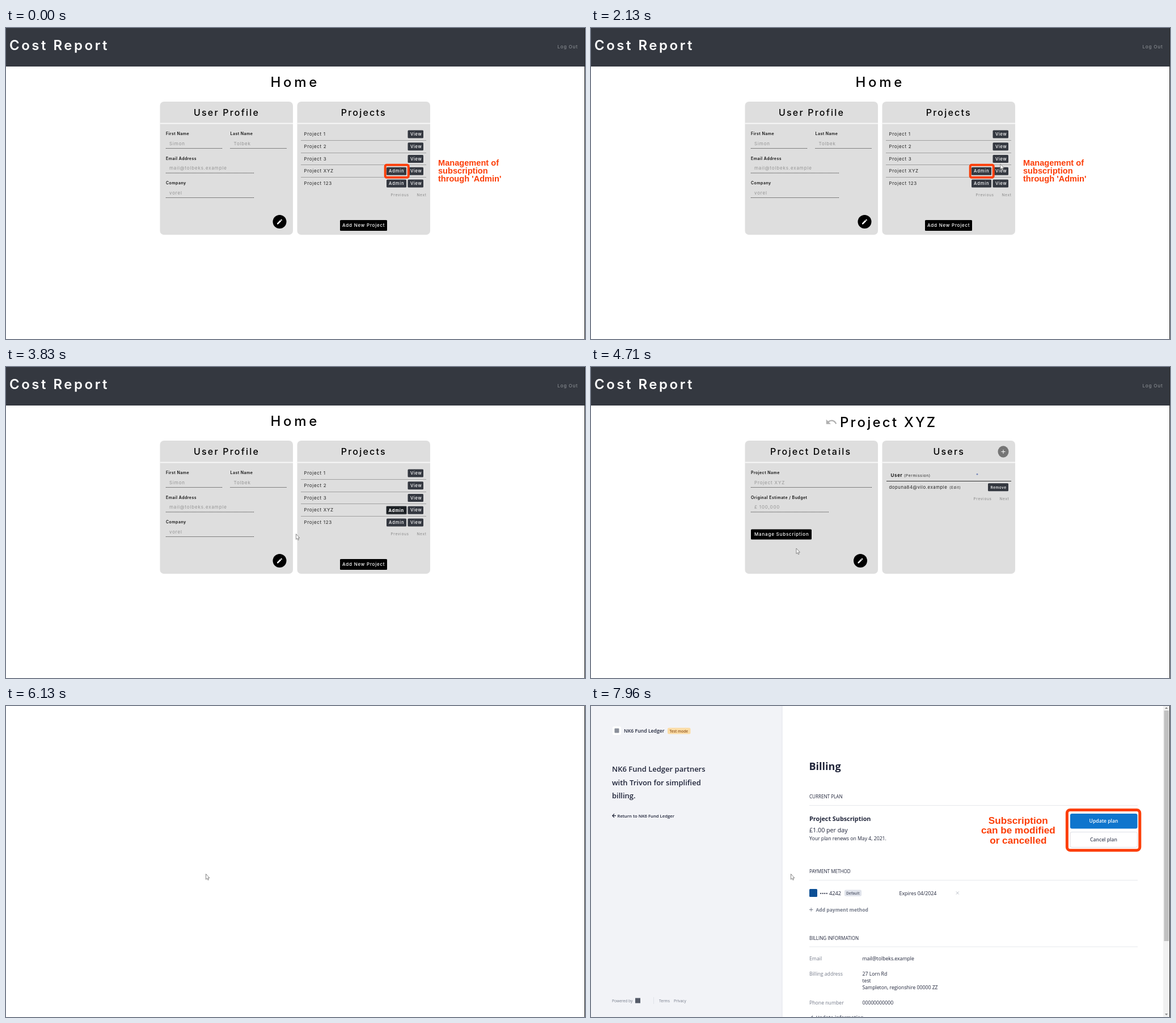
An HTML page that plays this animation: 1021x549 px, repeating every 8 s.

```html
<!DOCTYPE html>
<html lang="en">
<head>
<meta charset="utf-8">
<title>Managing a subscription</title>
<style>
  html, body { margin: 0; width: 100%; height: 100%; overflow: hidden; background: #fff; }
  svg { display: block; width: 100%; height: 100%; }
  text { white-space: pre; }
  .app { font-family: Inter, sans-serif; }
  .portal { font-family: "Open Sans", sans-serif; }
  .note { font-family: "Liberation Sans", Arial, sans-serif; font-weight: 700; }
</style>
</head>
<body>
<svg id="stage" viewBox="0 0 1021 549"></svg>
<script>
const LOOP = 8000;
const RED = '#fc3e08', DARK = '#343840', INK = '#20253a', MUTED = '#757b8a';
const USER = { first: 'Simon', last: 'Tolbek', email: 'mail@tolbeks.example', company: 'vorel' };
const SHOP = 'NK6 Fund Ledger';

// Drawing helpers: each returns SVG markup.
const text = (x, y, str, size, { fill = '#000', weight = 400, gap = 0, anchor = 'start' } = {}) =>
  `<text x="${x}" y="${y}" font-size="${size}" font-weight="${weight}" fill="${fill}" letter-spacing="${gap}" text-anchor="${anchor}">${str}</text>`;
const rect = (x, y, w, h, fill, r = 0, extra = '') =>
  `<rect x="${x}" y="${y}" width="${w}" height="${h}" rx="${r}" fill="${fill}" ${extra}/>`;
const path = (d, stroke, width = 1, extra = '') =>
  `<path d="${d}" fill="none" stroke="${stroke}" stroke-width="${width}" ${extra}/>`;
const rule = (x1, x2, y, color, extra) => path(`M${x1} ${y}H${x2}`, color, 1, extra);
const group = (id, cls, ...parts) => `<g id="${id}" class="${cls}">${parts.join('')}</g>`;

// Parts of the app pages
const label = (x, y, str) => text(x, y, str, 7, { weight: 600, gap: .45, fill: '#111' });
const field = (x, end, y, name, value) =>
  label(x, y, name) +
  text(x + 6, y + 17.5, value, 8, { fill: '#959595', gap: .85 }) +
  rule(x, end, y + 23.5, '#222', 'stroke-dasharray="1 1"');
const button = (x, y, w, h, str, textX, size, gap, fill = DARK) =>
  rect(x, y, w, h, fill, 1.5) +
  text(textX, y + h / 2 + size * .36, str, size, { fill: '#fff', weight: 500, gap });
const card = (x, titleX, title) =>
  rect(x, 130, 234.5, 235, '#dedede', 7) + rect(x, 167.5, 234.5, 2, '#f8f8f8') +
  text(titleX, 154.8, title, 16, { weight: 500, gap: 2.2 });
const editButton = x =>
  `<circle cx="${x}" cy="342" r="12"/>
   <path fill="#fff" transform="translate(${x - 6} 336) scale(.5)" d="M3 17.25V21h3.75L17.81 9.94l-3.75-3.75L3 17.25zM20.71 7.04a1 1 0 0 0 0-1.41l-2.34-2.34a1 1 0 0 0-1.41 0l-1.83 1.83 3.75 3.75z"/>`;
const pager = (x1, x2, y) =>
  text(x1, y, 'Previous', 6.5, { fill: '#888', gap: .7 }) + text(x2, y, 'Next', 6.5, { fill: '#888', gap: .7 });

const projectRow = (name, i) => {
  const y = 187.6 + i * 21.72;
  return text(525.4, y + 2.7, name, 8, { fill: '#222', gap: .7 }) +
    button(708.5, y - 7, 27.5, 14, 'View', 713, 7.5, .7) +
    (i > 2 ? button(671, y - 7, 35, 14, 'Admin', 675, 7.5, .9) : '') +
    (i < 4 ? rule(520, 741, Math.round(y + 10.4) + .5, '#a0a0a0') : '');
};

const header = group('header', 'app',
  rect(0, 0, 1021, 68, DARK),
  text(6, 38.8, 'Cost Report', 24, { fill: '#fff', weight: 600, gap: 3.5 }),
  text(972.4, 36, 'Log Out', 8, { fill: '#85898e', weight: 500, gap: .85 }));

const home = group('home', 'app',
  text(466.5, 104, 'Home', 24, { weight: 500, gap: 4.7 }),
  card(271.5, 331, 'User Profile'),
  field(282, 382, 189, 'First Name', USER.first),
  field(395.5, 495, 189, 'Last Name', USER.last),
  field(282, 438, 232.5, 'Email Address', USER.email),
  field(282, 438, 276, 'Company', USER.company),
  editButton(482.5),
  card(513.5, 590.8, 'Projects'),
  ['Project 1', 'Project 2', 'Project 3', 'Project XYZ', 'Project 123'].map(projectRow).join(''),
  pager(678.5, 724.5, 297),
  button(589, 339, 83, 19, 'Add New Project', 593, 8, .75, '#000'));

const adminPressed = group('adminPressed', 'app',
  rect(670.5, 245.5, 36, 14.5, '#1d2125', 1.5, 'stroke="#8b8d90"'),
  text(674.6, 255.5, 'Admin', 7.5, { fill: '#fff', weight: 700, gap: .7 }));

const homeNote = group('homeNote', 'note',
  rect(668.7, 241.7, 41, 22, 'none', 2.5, `stroke="${RED}" stroke-width="4"`),
  ['Management of', 'subscription', "through 'Admin'"]
    .map((line, i) => text(762, 243 + i * 14.2, line, 14.6, { fill: RED, weight: 700 })).join(''));

const project = group('project', 'app',
  `<path fill="#b0b0b0" transform="translate(413 86.3) scale(.9)" d="M12.5 8c-2.65 0-5.05.99-6.9 2.6L2 7v9h9l-3.62-3.62c1.39-1.16 3.16-1.88 5.12-1.88 3.54 0 6.55 2.31 7.6 5.5l2.37-.78C21.08 11.03 17.15 8 12.5 8z"/>`,
  text(439, 105.5, 'Project XYZ', 24, { weight: 500, gap: 3.2 }),
  card(271.5, 316, 'Project Details'),
  field(282, 495, 189, 'Project Name', 'Project XYZ'),
  field(282, 420, 232.5, 'Original Estimate / Budget', '£ 100,000'),
  button(282, 286.5, 107, 18, 'Manage Subscription', 288, 8, .8, '#000'),
  editButton(475),
  card(513.5, 603.5, 'Users'),
  '<ellipse cx="727" cy="149.5" rx="9.5" ry="10.3" fill="#757575"/>',
  path('M723.5 149.5h7M727 146v7', '#fff'),
  text(528.5, 193.5, 'User', 8, { weight: 600, gap: .7 }),
  text(552, 193.5, '(Permission)', 6.5, { fill: '#222', gap: .68 }),
  '<circle cx="681" cy="189.3" r="1.4" fill="#7284b8"/>',
  rule(521, 741, 201.5, '#333'),
  text(525.5, 215, 'dopuna84@vilo.example', 7.8, { fill: '#222', gap: .55 }),
  text(632, 215, '(Edit)', 6.5, { fill: '#222', gap: .65 }),
  button(700, 205.3, 36, 14, 'Remove', 704.6, 6.5, .5),
  pager(674.5, 720.5, 234.7));

const managePressed = group('managePressed', 'app',
  rect(281.7, 286.2, 107.6, 18.4, '#747477', 1.5, 'stroke="#a3b1d6" stroke-width="1.6"'),
  text(288, 298.4, 'Manage Subscription', 8, { fill: '#2c2c2e', weight: 500, gap: .8 }));

// Parts of the billing portal
const portal = group('portal', 'portal',
  rect(0, 0, 338, 549, '#f2f3f7'),
  rect(335, 0, 3, 549, '#eeeff4'),
  rect(38, 36, 15, 15, '#fff', 3), rect(41.5, 39.5, 8, 8, '#8a8f9a', 1),
  text(58, 47, SHOP, 8.7, { fill: INK, weight: 600 }),
  rect(135, 38.5, 40.5, 11, '#fbdca6', 2.5),
  text(138.6, 46.5, 'Test mode', 6.5, { fill: '#8f5520', weight: 600 }),
  [SHOP + ' partners', 'with Trivon for simplified', 'billing.']
    .map((line, i) => text(37, 116 + i * 23.6, line, 13, { fill: INK, weight: 600 })).join(''),
  path('M44 193.7H38M41 190.5l-3.2 3.2 3.2 3.2', INK, 1.2),
  text(46.5, 196.5, 'Return to ' + SHOP, 7.7, { fill: INK, weight: 600 }),
  text(37, 522.7, 'Powered by', 6.7, { fill: MUTED }),
  rect(78, 515.5, 9, 9, '#555b68'),
  path('M110.5 514V526', '#dfe2e8'),
  text(120, 522.7, 'Terms', 6.6, { fill: MUTED }),
  text(146, 522.7, 'Privacy', 6.6, { fill: MUTED }));

const spinner = group('spinner', '', path('M679 269.2a4 4 0 1 1 -3.2 6.3', '#d3d5da', 1.2));

const section = (y, title) => text(385, y, title, 8.1, { fill: INK }) + rule(385, 964, y + 12.5, '#e6e8ec');
const detail = (y, name, lines) =>
  text(385, y, name, 8.7, { fill: MUTED }) +
  lines.map((line, i) => text(478.5, y + i * 12.4, line, 8.7, { fill: INK })).join('');

const billing = group('billing', 'portal',
  text(384.5, 112.8, 'Billing', 18, { fill: INK, weight: 700 }),
  section(163, 'CURRENT PLAN'),
  text(385, 202.8, 'Project Subscription', 10.8, { fill: INK, weight: 700 }),
  text(385, 223, '£1.00 per day', 10.7, { fill: INK }),
  text(385, 237, 'Your plan renews on May 4, 2021.', 8.7, { fill: INK }),
  rect(845, 190, 118.5, 26.5, '#0f75cd', 3),
  text(904, 206.3, 'Update plan', 8.6, { fill: '#fff', weight: 600, anchor: 'middle' }),
  rect(845, 222.5, 118.5, 27, '#fff', 3, 'stroke="#dcdfe6"'),
  text(904, 239.3, 'Cancel plan', 8.6, { fill: '#454b5e', weight: 600, anchor: 'middle' }),
  section(295, 'PAYMENT METHOD'),
  rect(385, 323, 14, 14, '#0c4f95', 1.5),
  text(403.5, 334, '•••• 4242', 9.3, { fill: INK }),
  rect(447, 324.5, 30, 11.3, '#dfe2ea', 2.5),
  text(450, 332.5, 'Default', 6.6, { fill: '#545a6c', weight: 600 }),
  text(543.5, 334, 'Expires 04/2024', 8.9, { fill: INK }),
  path('M643.8 327.5l5 5M648.8 327.5l-5 5', '#b4b8c2', .9),
  path('M385 359.5h6.4M388.2 356.3v6.4', MUTED, 1),
  text(396.5, 362.8, 'Add payment method', 8.5, { fill: MUTED, weight: 700 }),
  section(412.5, 'BILLING INFORMATION'),
  detail(449.2, 'Email', [USER.email]),
  detail(475.5, 'Billing address', ['27 Lorn Rd', 'test', 'Sampleton, regionshire 00000 ZZ']),
  detail(526.5, 'Phone number', ['00000000000']),
  path('M387 551l4-4', MUTED, 1.6),
  text(396.5, 553, 'Update information', 8.5, { fill: MUTED, weight: 700 }),
  rect(1009, 0, 11, 549, '#f1f1f1'), rect(1010.5, 8, 8.5, 407, '#c1c1c1'),
  '<path fill="#888" d="M1012 5l2.6-3 2.6 3zM1012 543l2.6 3 2.6-3z"/>',
  `<g class="note">${rect(839.4, 183.5, 128.4, 71.2, 'none', 5.5, `stroke="${RED}" stroke-width="5"`)}`,
  ['Subscription', 'can be modified', 'or cancelled']
    .map((line, i) => text(753.3, 208 + i * 17.3, line, 17.2, { fill: RED, weight: 700, anchor: 'middle' })).join(''),
  '</g>');

const cursor = group('cursor', '',
  '<path id="arrow" fill="#fff" stroke="#777" stroke-width=".9" stroke-linejoin="round" d="M0 0V9.6L2.1 7.7 3.5 10.8 5 10.1 3.6 7.1H6.4Z"/>',
  '<path id="hand" fill="#fff" stroke="#333" stroke-width=".7" stroke-linejoin="round" d="M-1 .8Q0-.6 1 .8V5q1-.8 1.8.2 1-.6 1.7.4 1.2-.3 1.3.9V9.5L4.8 13H-.8L-4 8.6q0-1.6 1.4-1L-1 9Z"/>');

const stage = document.getElementById('stage');
stage.innerHTML = rect(0, 0, 1021, 549, '#fff') + header + home + adminPressed + homeNote +
  project + managePressed + portal + spinner + billing +
  rect(1020, 0, 1, 549, '#222') + cursor;

// Visible interval of each part, in ms
const visible = {
  header: [0, 6130], home: [0, 4400], homeNote: [0, 2800], adminPressed: [3000, 4400],
  project: [4400, 6130], managePressed: [5600, 6130],
  portal: [6920, LOOP], spinner: [6920, 7560], billing: [7560, LOOP],
  hand: [2480, 3440]
};

// Cursor stops: time, x, y
const stops = [
  [0, 876, 556], [880, 876, 556], [1670, 747, 291], [2130, 722, 240], [2520, 682, 251],
  [3290, 680, 250], [3420, 680, 250], [4210, 356, 336], [4710, 362, 320],
  [5080, 362, 320], [5500, 352.5, 296.5], [LOOP, 352.5, 296.5]
];

function cursorAt(t) {
  const i = stops.findIndex(stop => stop[0] > t);
  const [t0, x0, y0] = stops[i - 1], [t1, x1, y1] = stops[i];
  const k = (t - t0) / (t1 - t0);
  return [x0 + (x1 - x0) * k, y0 + (y1 - y0) * k];
}

const part = id => document.getElementById(id);
const show = (id, on) => part(id).setAttribute('display', on ? 'inline' : 'none');

function draw(t) {
  for (const [id, [from, to]] of Object.entries(visible)) show(id, t >= from && t < to);
  show('arrow', t < visible.hand[0] || t >= visible.hand[1]);
  part('cursor').setAttribute('transform', `translate(${cursorAt(t)})`);
  part('spinner').setAttribute('transform', `rotate(${(t - 7380) * .36} 679 273.2)`);
}

const start = performance.now();
function tick() {
  draw((performance.now() - start) % LOOP);
  requestAnimationFrame(tick);
}
tick();
</script>
</body>
</html>
```
